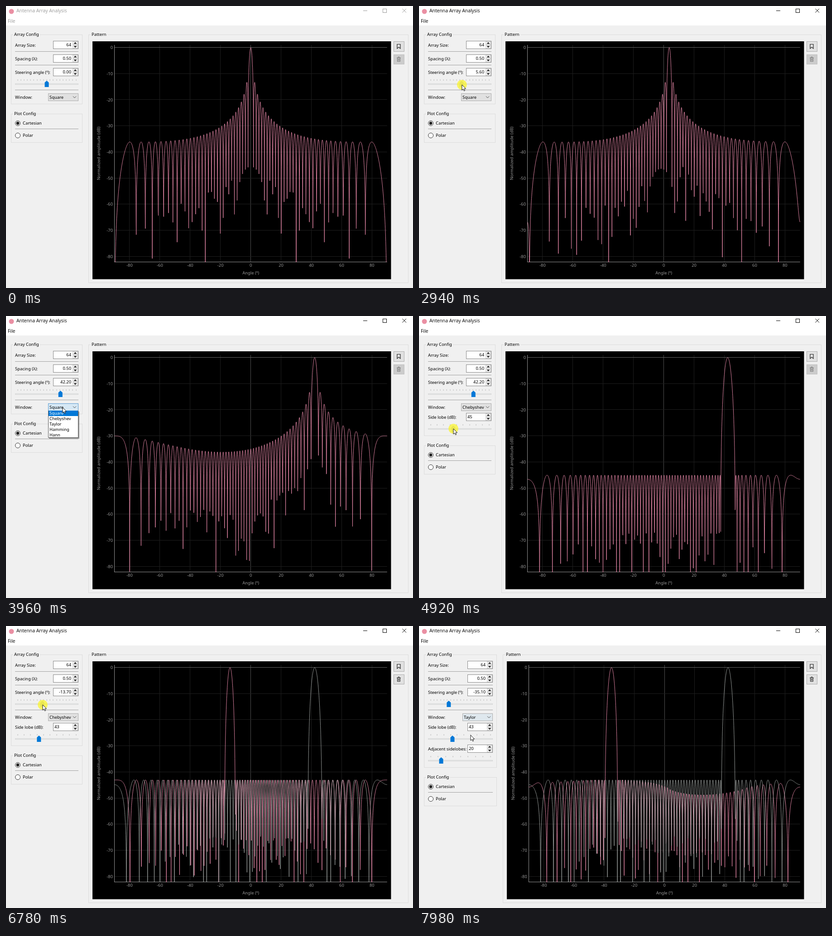
These frames come from a looping animation (899 px wide and 623 px high, 8000 ms). An HTML page with a canvas:

```html
<!DOCTYPE html>
<html lang="en">
<head>
<meta charset="utf-8">
<title>Antenna Array Analysis</title>
<style>
html, body { margin: 0; width: 100%; height: 100%; overflow: hidden; background: #f0f0f0; }
canvas { display: block; }
</style>
</head>
<body>
<canvas id="stage" width="899" height="623"></canvas>
<script>
const ctx = document.getElementById('stage').getContext('2d');
const LOOP = 8000, STEP = 60, N = 64;
const UI = '9.4px "Noto Sans", sans-serif', TITLE = '10.4px "Open Sans", sans-serif';
const BLUE = '#0078d7', PINK = '#f48fb1', GREY = '#a3a8a5';
const WINDOWS = ['Square', 'Chebyshev', 'Taylor', 'Hamming', 'Hann'];

// Slider values over time: [ms, value]
const STEERING = [[2770, 0], [2940, 5.6], [3420, 42.2], [6540, 42.2], [6720, -13.7], [6780, -13.7], [7080, -35.1]];
const SIDELOBE = [[4500, 60], [4920, 45], [5100, 43]];

function track(t, keys) {
  const next = keys.findIndex(k => k[0] > t);
  if (next === 0) return keys[0][1];
  if (next < 0) return keys[keys.length - 1][1];
  const [t0, a] = keys[next - 1], [t1, b] = keys[next];
  return a + (b - a) * (t - t0) / (t1 - t0);
}

const steeringAt = t => Math.round(track(t, STEERING) * 10) / 10;
const levelAt = t => Math.round(track(t, SIDELOBE));
const anglePart = angle => (angle + 90) / 180;
const levelPart = level => (level - 10) / 90;
const sliderX = (part, shift = 0) => 25.5 + part * (129 + shift);

// Things the mouse presses
const ENTRY = { at: () => [640, 320] };
const UP = { at: () => [150, 110], step: 0.5 };
const DOWN = { at: () => [150, 120], step: -0.5 };
const STEER = { at: t => [sliderX(anglePart(steeringAt(t))) + 0.8, 174] };
const LEVEL = { at: t => [sliderX(levelPart(levelAt(t))) + 0.3, 249] };
const COMBO = { at: () => [125, 202] };
const BOOKMARK = { at: () => [867, 91] };
const pick = kind => ({ at: () => [125 - 5.5 * kind, 217 + 12 * kind], kind });

const GESTURES = [[240, 240, ENTRY], [780, 960, UP], [1620, 1740, UP], [1980, 2100, DOWN], [2220, 2340, DOWN],
  [2760, 3480, STEER], [3840, 3900, COMBO], [4200, 4260, pick(1)], [4500, 5340, LEVEL], [6060, 6120, BOOKMARK],
  [6540, 7140, STEER], [7500, 7560, COMBO], [7860, 7920, pick(2)]
].map(([down, up, spot]) => ({ down, up, spot }));

// The mouse rests, then travels to the next spot; longer ways take longer
function mouseAt(t) {
  const next = GESTURES.findIndex(g => g.up > t);
  if (next < 0) return GESTURES[GESTURES.length - 1].spot.at(t);
  const from = GESTURES[Math.max(0, next - 1)], to = GESTURES[next];
  const [x0, y0] = from.spot.at(t), [x1, y1] = to.spot.at(t);
  const start = Math.max(from.up, to.down - 180 - 0.4 * Math.hypot(x1 - x0, y1 - y0));
  const p = t >= to.down ? 1 : Math.max(0, (t - start) / (to.down - start));
  const eased = p * p * (3 - 2 * p);
  return [x0 + (x1 - x0) * eased, y0 + (y1 - y0) * eased];
}

function stateAt(t) {
  const begun = GESTURES.filter(g => g.down <= t), done = GESTURES.filter(g => g.up <= t);
  const current = begun[begun.length - 1], last = done[done.length - 1];
  const held = current && t < current.up ? current.spot : null;
  const picked = done.filter(g => g.spot.kind).pop();
  return {
    held,
    kind: picked ? picked.spot.kind : 0,
    spacing: begun.reduce((sum, g) => sum + (g.spot.step || 0), 0.5),
    focused: Boolean(current && current.spot.step),
    open: Boolean(last && last.spot === COMBO),
    fading: Boolean(picked && t - picked.up <= STEP),
    saved: done.some(g => g.spot === BOOKMARK),
    angle: steeringAt(t),
    level: levelAt(t)
  };
}

// Array patterns: |gain| for half the phase step between elements
function squareGain(h) {
  const s = Math.sin(h);
  return Math.abs(s) < 1e-9 ? 1 : Math.abs(Math.sin(N * h) / (N * s));
}

function chebyshevGain(level) {
  const ratio = 10 ** (level / 20), x0 = Math.cosh(Math.acosh(ratio) / (N - 1));
  return h => {
    const x = Math.abs(x0 * Math.cos(h));
    return (x > 1 ? Math.cosh((N - 1) * Math.acosh(x)) : Math.abs(Math.cos((N - 1) * Math.acos(x)))) / ratio;
  };
}

function taylorGain(level, nbar) {
  const a2 = (Math.acosh(10 ** (level / 20)) / Math.PI) ** 2;
  const s2 = nbar ** 2 / (a2 + (nbar - 0.5) ** 2);
  const coefs = [];
  for (let m = 1; m < nbar; m++) {
    let f = m % 2 ? 0.5 : -0.5;
    for (let i = 1; i < nbar; i++) {
      f *= 1 - m * m / s2 / (a2 + (i - 0.5) ** 2);
      if (i !== m) f /= 1 - m * m / (i * i);
    }
    coefs.push(f);
  }
  const weights = Array.from({ length: N / 2 }, (_, k) =>
    coefs.reduce((sum, f, i) => sum + 2 * f * Math.cos(2 * Math.PI * (i + 1) * (k + 0.5) / N), 1));
  const total = weights.reduce((a, b) => a + b);
  return h => Math.abs(weights.reduce((sum, w, k) => sum + w * Math.cos((2 * k + 1) * h), 0)) / total;
}

// Drawing helpers
function box(x, y, w, h, fill, stroke) {
  if (fill) { ctx.fillStyle = fill; ctx.fillRect(x, y, w, h); }
  if (stroke) { ctx.strokeStyle = stroke; ctx.lineWidth = 1; ctx.strokeRect(x + 0.5, y + 0.5, w - 1, h - 1); }
}

function path(points, stroke, fill, close, width = 1) {
  ctx.beginPath();
  points.forEach(p => ctx.lineTo(p[0], p[1]));
  if (close) ctx.closePath();
  if (fill) { ctx.fillStyle = fill; ctx.fill(); }
  if (stroke) { ctx.strokeStyle = stroke; ctx.lineWidth = width; ctx.stroke(); }
}

function circle(x, y, r, fill, stroke) {
  ctx.beginPath();
  ctx.arc(x, y, r, 0, 7);
  if (fill) { ctx.fillStyle = fill; ctx.fill(); }
  if (stroke) { ctx.strokeStyle = stroke; ctx.lineWidth = 1; ctx.stroke(); }
}

function text(str, x, y, color = '#000', align = 'left', font = UI) {
  ctx.font = font;
  ctx.fillStyle = color;
  ctx.textAlign = align;
  ctx.textBaseline = 'middle';
  ctx.fillText(str, x, y);
}

function group(label, x, y, right, bottom) {
  box(x, y, right - x, bottom - y, null, '#dcdcdc');
  ctx.font = UI;
  box(x + 5, y - 4, ctx.measureText(label).width + 4, 9, '#f0f0f0');
  text(label, x + 7, y);
}

function spinBox(value, x, y, { left = false, selected = false } = {}) {
  box(x, y - 9, 56, 18, '#fff', selected ? '#222' : '#8a8a8a');
  for (const d of [-1, 1]) {
    box(x + 43, y - 4 + d * 4, 12, 8, '#f0f0f0', '#d0d0d0');
    path([[x + 45.5, y + d * 2.5], [x + 52.5, y + d * 2.5], [x + 49, y + d * 6]], null, '#111', true);
  }
  if (selected) box(x + 21, y - 6, 19, 12, BLUE);
  text(value, left ? x + 3 : x + 40, y + 0.5, selected ? '#fff' : '#000', left ? 'left' : 'right');
}

function slider(part, y, ticks, shift, pressed) {
  for (let i = 0; i < ticks; i++) box(Math.round(sliderX(i / (ticks - 1), shift)) - 0.5, y - 10, 1, 3, '#b4b4b4');
  box(20, y - 1, 140 + shift, 3, '#e7eaea', '#d6d6d6');
  const x = sliderX(part, shift);
  path([[x - 4.5, y - 3], [x, y - 7], [x + 4.5, y - 3], [x + 4.5, y + 7], [x - 4.5, y + 7]],
    null, pressed ? '#c8c8c8' : BLUE, true);
}

const divider = (y, shift) => box(20, y, 140 + shift, 1, '#a0a0a0');

function radio(label, y, on) {
  circle(26, y, 5.5, '#fff', '#333');
  if (on) circle(26, y, 3.4, '#222');
  text(label, 37, y + 0.5);
}

function titleBar(active) {
  const ink = active ? '#000' : '#999';
  box(0, 0, 899, 43, '#fff');
  circle(12, 12, 5.5, '#ea8fa3');
  text('Antenna Array Analysis', 23, 11, ink, 'left', TITLE);
  text('File', 4, 34.5, ink, 'left', TITLE);
  box(789, 10, 9, 1, ink);
  box(832, 6, 9, 9, null, ink);
  path([[875.5, 6], [884, 14.5]], ink);
  path([[884, 6], [875.5, 14.5]], ink);
}

function sideButtons(canClear) {
  box(856, 78, 24, 23, '#e1e1e1', '#adadad');
  path([[864, 84.5], [871, 84.5], [871, 94], [867.5, 91], [864, 94]], '#222', null, true, 1.2);
  const ink = canClear ? '#222' : '#777';
  box(856, 107, 24, 22, canClear ? '#e1e1e1' : '#ccc', canClear ? '#adadad' : '#bfbfbf');
  path([[863, 114.5], [872, 114.5]], ink);
  path([[866, 114], [866, 112.5], [869, 112.5], [869, 114]], ink);
  path([[864.5, 115], [864.5, 122.5], [870.5, 122.5], [870.5, 115]], ink);
  for (const x of [866.5, 868.5]) path([[x, 116], [x, 121]], ink);
}

function plot(shift, curves) {
  const left = 239.5 + 0.95 * shift, right = 841.8;
  const px = deg => left + (deg + 90) / 180 * (right - left);
  const py = db => 92 - db * 5.77;
  box(191 + shift, 78, 659.5 - shift, 525.6, '#000');
  for (let v = -80; v <= 80; v += 20) {
    box(Math.floor(px(v)), 86, 1, 480, v ? '#1e1e1e' : '#505050');
    text(v, px(v), 573, '#969696', 'center');
  }
  for (let v = -80; v <= 0; v += 10) {
    box(left, Math.floor(py(v) - 0.5), right - left, 1, v ? '#1e1e1e' : '#666');
    text(v, left - 3.5, py(v) + 0.5, '#969696', 'right');
  }
  text('Angle (º)', px(0), 590.5, '#969696', 'center');
  ctx.save();
  ctx.translate(205.5 + shift, 325.5);
  ctx.rotate(-Math.PI / 2);
  text('Normalized amplitude (dB)', 0, 0, '#969696', 'center');
  ctx.restore();
  box(Math.floor(left), 86, 1, 480, '#969696');
  box(left, 565, right - left, 1, '#969696');

  ctx.save();
  ctx.beginPath();
  ctx.rect(left, 86, right - left + 0.5, 480);
  ctx.clip();
  ctx.lineJoin = 'bevel';
  for (const { gain, spacing, angle, color } of curves) {
    const rad = Math.PI / 180, points = [];
    for (let i = -900; i <= 900; i++) {
      const h = Math.PI * spacing * (Math.sin(i / 10 * rad) - Math.sin(angle * rad));
      points.push([px(i / 10), py(20 * Math.log10(Math.max(gain(h), 1e-7)))]);
    }
    path(points, color, null, false, 0.9);
  }
  ctx.restore();
}

function comboBox(name, shift, open, fading) {
  const x = 93 + shift;
  box(x, 193, 67, 17, open ? '#d6e8f5' : fading ? '#dfe8ee' : '#e1e1e1', open ? '#5a9bd0' : '#adadad');
  text(name, x + 3, 202);
  path([[x + 55, 199.5], [x + 58.5, 203], [x + 62, 199.5]], '#444');
}

function popup(pointerY, current) {
  const hovered = pointerY > 209 ? Math.floor((pointerY - 209) / 12) : current;
  box(95, 211, 67, 60, 'rgba(0,0,0,.35)');
  box(93, 209, 67, 60, '#fff', '#555');
  box(94, 209 + hovered * 12, 65, 12, BLUE);
  WINDOWS.forEach((name, i) => text(name, 96, 215.5 + i * 12, i === hovered ? '#fff' : '#000'));
}

function pointer(x, y, pressed) {
  if (pressed) circle(x, y, 10.8, 'rgba(252,246,20,.66)');
  const arrow = [[0, 0], [0, 12], [2.8, 9.5], [4.7, 13.6], [6.6, 12.8], [4.8, 8.9], [8.5, 8.7]];
  path(arrow.map(p => [x + p[0], y + p[1]]), '#000', '#fff', true, 0.9);
}

function draw(t) {
  const { held, kind, spacing, focused, open, fading, saved, angle, level } = stateAt(t);
  const shift = kind === 2 ? 3 : 0, extra = kind * 48;
  const fieldX = 104 + shift, edge = 169 + shift;

  box(0, 0, 899, 623, '#f0f0f0');
  titleBar(t >= ENTRY_TIME);

  group('Array Config', 11, 63, edge, 217 + extra);
  text('Array Size:', 20, 87);
  spinBox(N, fieldX, 86);
  divider(100, shift);
  text('Spacing (λ):', 20, 117);
  spinBox(spacing.toFixed(2), fieldX, 116, { selected: focused });
  if (t >= 1200 && t < 1380) box(125, 110, 1, 12, '#000');
  divider(130, shift);
  text('Steering angle (º):', 20, 147);
  spinBox(angle.toFixed(2), fieldX, 146);
  slider(anglePart(angle), 172, 19, shift, held === STEER);
  divider(185, shift);
  text('Window:', 20, 202);
  comboBox(WINDOWS[kind], shift, open, fading);
  if (kind > 0) {
    text('Side lobe (dB):', 20, 224);
    spinBox(level, fieldX, 223, { left: true });
    slider(levelPart(level), 249, 10, shift, held === LEVEL);
  }
  if (kind > 1) {
    text('Adjacent sidelobes:', 20, 272);
    spinBox(20, fieldX, 271, { left: true });
    slider(0.178, 297, 9, shift, false);
  }

  group('Plot Config', 11, 238 + extra, edge, 302 + extra);
  radio('Cartesian', 259 + extra, true);
  divider(271 + extra, shift);
  radio('Polar', 286 + extra, false);

  group('Pattern', 182 + shift, 63, 889, 612);
  const gain = [() => squareGain, () => chebyshevGain(level), () => taylorGain(level, 20)][kind]();
  // The plot follows the slider one step late
  const curves = [{ gain, spacing, angle: steeringAt(t - STEP), color: PINK }];
  if (saved) curves.push({ gain: chebyshevGain(43), spacing: 0.5, angle: 42.2, color: GREY });
  plot(shift, curves);
  sideButtons(saved);

  if (t < ENTRY_TIME) return;
  const [x, y] = mouseAt(t);
  if (open) popup(y, kind);
  pointer(x, y, held);
}

const ENTRY_TIME = GESTURES[0].up;
let shown = -1;
function tick(now) {
  const t = Math.floor(now % LOOP / STEP) * STEP;
  if (t !== shown) draw(shown = t);
  requestAnimationFrame(tick);
}
draw(0);
requestAnimationFrame(tick);
</script>
</body>
</html>
```
